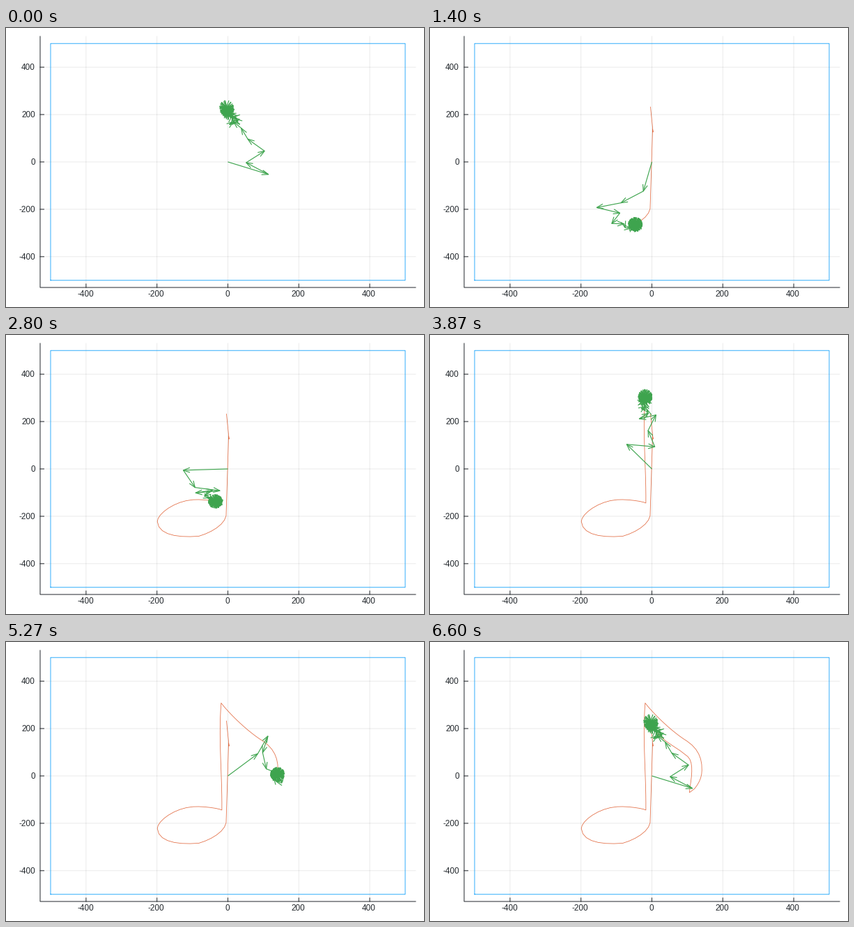
Recreate the animation shown at these times as a matplotlib script. Size 600 by 400 pixels, loop 6.67 s.

```python
from math import comb

import numpy as np
import matplotlib.pyplot as plt
from matplotlib.animation import FuncAnimation
from matplotlib.collections import LineCollection

W, H, DPI = 600, 400, 100
TICK, TICKS = 23, 290          # 290 x 23 ms = one 6670 ms loop
POSES = 100                    # 15 poses per second
N = POSES - 1
PX = 72 / DPI
BLUE, ORANGE, GREEN, INK = "#009afa", "#e36f47", "#3ea44e", "#24292e"

# Eighth note as Bezier strokes: number of samples, then control points
NOTE = [
    (5, -4 + 232j, 5 + 100j),
    (12, 2 + 138j, -5 - 198j),
    (6, -5 - 198j, -10 - 235j, -45 - 268j, -82 - 284j),
    (7, -82 - 284j, -140 - 291j, -196 - 280j, -199 - 222j),
    (8, -199 - 222j, -199 - 190j, -150 - 135j, -98 - 130j),
    (6, -98 - 130j, -70 - 127j, -25 - 137j, -17 - 144j),
    (14, -17 - 144j, -16 + 7j, -27 + 157j, -19 + 308j),
    (14, -19 + 308j, -8 + 285j, 45 + 197j, 100 + 146j),
    (6, 100 + 146j, 130 + 115j, 142 + 75j, 141 + 24j),
    (6, 141 + 24j, 141 - 25j, 111 - 69j),
    (9, 106 - 70j, 107 - 35j, 123 + 52j, 101 + 82j),
    (6, 101 + 82j, 60 + 135j, 15 + 150j, -4 + 232j),
]


def bezier(n, *pts):
    t, d = np.arange(n) / n, len(pts) - 1
    return sum(comb(d, i) * t**i * (1 - t)**(d - i) * p
               for i, p in enumerate(pts))


def to_px(z):
    return np.column_stack([318.5 + 0.509 * z.real, 192 - 0.3396 * z.imag])


outline = np.concatenate([bezier(*stroke) for stroke in NOTE])
coef = np.fft.fft(outline) / N
order = np.argsort(-np.abs(coef))
coef, freq = coef[order], np.fft.fftfreq(N, 1 / N)[order]


def chain(k):
    spin = coef * np.exp(2j * np.pi * freq * k / N)
    return np.concatenate([[0], np.cumsum(spin)])


def arrows(points, size=10, spread=np.radians(20)):
    xy = to_px(points)
    tail, tip = xy[:-1], xy[1:]
    dx, dy = (tail - tip).T
    back = np.arctan2(dy, dx)
    left, right = (tip + size * np.column_stack([np.cos(a), np.sin(a)])
                   for a in (back - spread, back + spread))
    return [*np.stack([tail, tip], axis=1),
            *np.stack([left, tip, right], axis=1)]


trail = to_px(outline[np.arange(POSES) % N])

fig = plt.figure(figsize=(W / DPI, H / DPI), dpi=DPI, facecolor="white")
ax = fig.add_axes([0, 0, 1, 1])
ax.set_xlim(0, W)
ax.set_ylim(H, 0)
ax.axis("off")


def line(xs, ys, color, width=1, **kw):
    return ax.plot(xs, ys, color=color, lw=width * PX, snap=False, **kw)[0]


font = dict(family="Liberation Sans", size=8.5, color=INK, va="baseline")
for v in range(-400, 401, 200):
    (px, py), = to_px(np.array([v + 1j * v]))
    line([px, px], [12, 372], "black", 0.8, alpha=0.1)
    line([49, 588], [py, py], "black", 0.8, alpha=0.1)
    line([px, px], [372, 367], INK)
    line([49, 54.5], [py, py], INK)
    ax.text(px - 1, 385, str(v), ha="center", **font)
    ax.text(42, py + 4, str(v), ha="right", **font)
line([49, 49, 588], [12, 372, 372], INK)

corners = 500 * np.array([-1 - 1j, 1 - 1j, 1 + 1j, -1 + 1j, -1 - 1j])
line(*to_px(corners).T, BLUE, 0.8)
trace = line([], [], ORANGE, 0.8)
vectors = LineCollection([], colors=GREEN, linewidths=1.15 * PX)
ax.add_collection(vectors)


def update(n):
    # Poses change on 10 ms marks, so round half a mark up
    now = (n + 1) * TICK - 1
    k = min(N, int((now + 5) * 15 / 1000))
    trace.set_data(*trail[:k + 1].T)
    vectors.set_segments(arrows(chain(k)))
    return trace, vectors


anim = FuncAnimation(fig, update, frames=TICKS, interval=TICK,
                     repeat=True, repeat_delay=0, blit=False)
plt.show()
```
